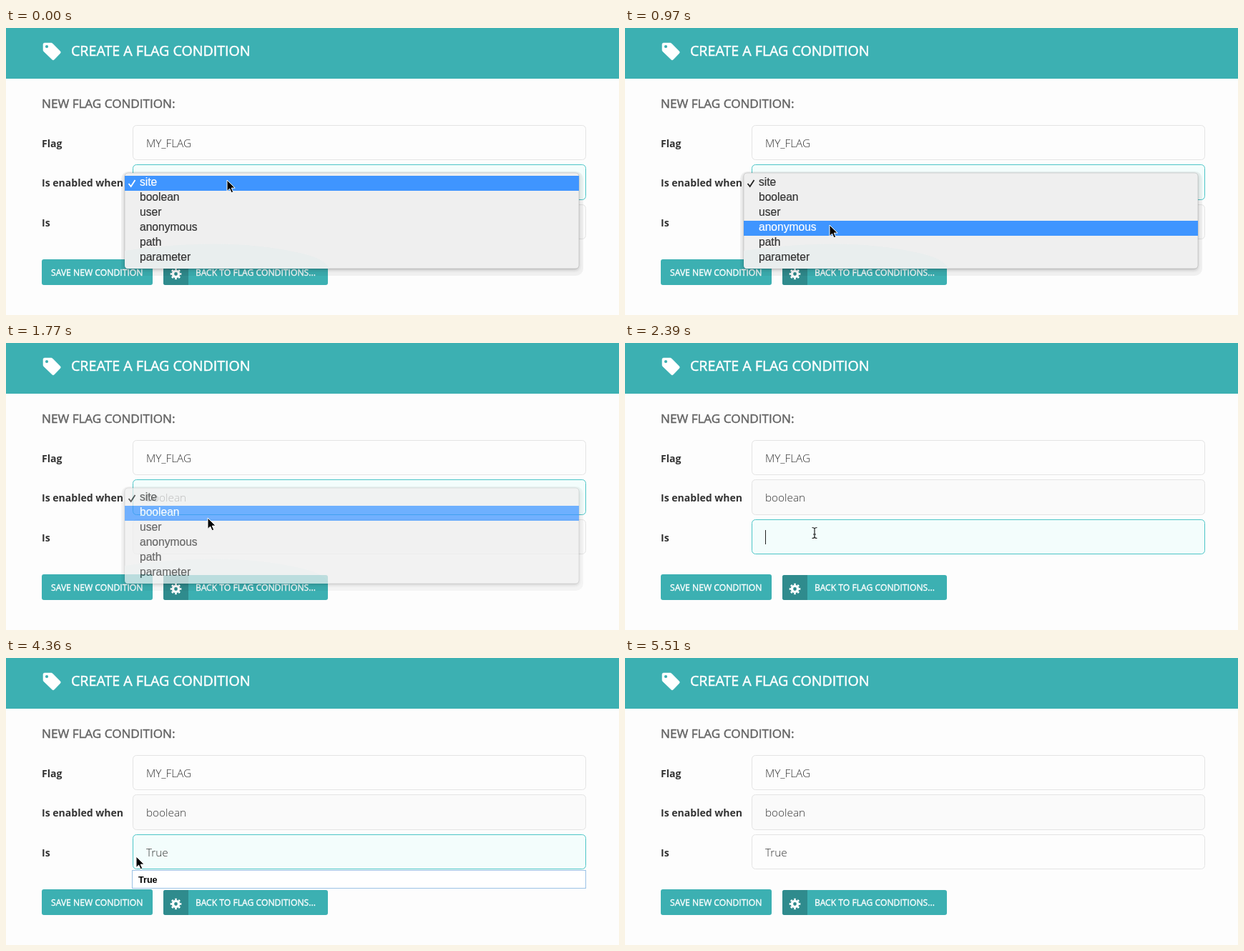
Write an HTML page that moves like this. It is 857 px wide and 402 px high and loops after 6760 ms.

```html
<!DOCTYPE html>
<html lang="en">
<head>
<meta charset="utf-8">
<title>Create a flag condition</title>
<style>
html, body { margin: 0; width: 857px; height: 402px; overflow: hidden; background: #fdfdfd; }
svg { display: block; }
text { font-family: "Open Sans", sans-serif; white-space: pre; }
.caps { fill: #fff; stroke: #fff; stroke-width: .5px; }
.small { font-size: 12.17px; stroke-width: .35px; }
.label { font-size: 14.05px; font-weight: 700; fill: #333; }
.value { font-size: 15.3px; font-weight: 300; fill: #333; }
.field { fill: #fdfdfd; stroke: #e4e4e4; }
.muted { fill: #fafafa; }
.focus { fill: #f3fdfc; stroke: #4cc5c7; }
.teal { fill: #3cb0b2; }
.item, .hint { font-family: "Liberation Sans", Arial, sans-serif; }
.item { font-size: 15.6px; fill: #333; stroke: #333; stroke-width: .2px; }
.item.on { fill: #fff; stroke: #fff; }
.hint { font-size: 12.6px; font-weight: 700; }
#panel { filter: drop-shadow(0 2px 2px rgba(0, 0, 0, .2)); }
</style>
</head>
<body>
<svg width="857" height="402" viewBox="0 0 857 402">
  <rect class="teal" width="857" height="71"/>
  <path fill="#fff" stroke="#fff" stroke-width=".6" d="M52 23q0-2 2-2h9q1.3 0 2.3 1l10.4 10.6q1.3 1.4 0 2.8l-8.4 8.8q-1.3 1.3-2.6 0L53 33q-1-1-1-2.300z"/>
  <circle class="teal" cx="57" cy="26" r="2.100"/>
  <text class="caps" x="91" y="39" font-size="19.63">CREATE A FLAG CONDITION</text>
  <text x="50" y="112" font-size="17.1" fill="#666" stroke="#666" stroke-width=".5">NEW FLAG CONDITION:</text>

  <text class="label" x="50" y="167">Flag</text>
  <text class="label" x="50" y="222">Is enabled when</text>
  <text class="label" x="50" y="278">Is</text>
  <rect class="field" x="177.5" y="136.5" width="633" height="48" rx="5"/>
  <rect class="field" id="kind" x="177.5" y="191.5" width="633" height="49" rx="5"/>
  <rect class="field" id="input" x="177.5" y="247.5" width="633" height="48" rx="5"/>
  <text class="value" x="196" y="167">MY_FLAG</text>
  <text class="value" x="196" y="222">boolean</text>
  <text class="value" x="196" y="278" id="typed"></text>
  <path id="caret" d="M196.500 262v20" stroke="#222"/>

  <rect class="teal" x="50" y="324" width="155" height="36" rx="3"/>
  <text class="caps small" x="63" y="347">SAVE NEW CONDITION</text>
  <rect class="teal" x="220" y="325" width="230" height="35" rx="3"/>
  <path fill="#2f8b8d" d="M255 325v35h-32q-3 0-3-3v-29q0-3 3-3z"/>
  <g fill="none" stroke="#fff" transform="translate(237.5 344.500)">
    <circle r="4.100" stroke-width="3.400"/>
    <circle r="6.500" stroke-width="2.600" pathLength="16" stroke-dasharray="1" stroke-dashoffset=".5"/>
  </g>
  <text class="caps small" x="265" y="347">BACK TO FLAG CONDITIONS...</text>

  <g id="hint">
    <rect x="176.500" y="297.500" width="634" height="25" fill="#fff" stroke="#9cc3e6"/>
    <text class="hint" x="185" y="315">True</text>
  </g>
  <g id="menu">
    <rect x="161" y="201" width="646" height="146" rx="10" opacity=".05"/>
    <path id="panel" fill="#efefef" stroke="#000" stroke-opacity=".12" d="M171 203h625q5 0 5 5v124q0 5-5 5H171q-5 0-5-5V208q0-5 5-5z"/>
    <path fill="#e9eeee" d="M166 312q140-20 240 2q40 8 46 23H171q-5 0-5-5z"/>
    <rect id="bar" x="166" width="635" height="21" fill="#3f95ff"/>
    <path id="check" fill="none" stroke-width="1.800" d="M171.500 218l3.200 4 5.800-9"/>
  </g>
  <path id="arrow" stroke="#fff" stroke-linejoin="round" d="M0 0V15.500l3.600-3.400 2.500 5.600 2.600-1.100-2.500-5.500h5z"/>
  <path id="beam" fill="none" stroke="#222" stroke-width="1.200" d="M-3.500-7.500q3.500 0 3.500 2v11q0 2-3.500 2M3.500-7.500q-3.500 0-3.500 2v11q0 2 3.500 2M-2 2h4"/>
</svg>
<script>
const LOOP = 6760, STEP = 88.8, ROW = 21, TOP = 207;
const $ = id => document.getElementById(id);
const show = (id, on) => $(id).style.display = on ? '' : 'none';
const clamp = (v, max) => Math.max(0, Math.min(max, v));

const items = ['site', 'boolean', 'user', 'anonymous', 'path', 'parameter'].map((name, i) => {
  const text = document.createElementNS('http://www.w3.org/2000/svg', 'text');
  text.textContent = name;
  text.setAttribute('x', 187);
  text.setAttribute('y', TOP + 14 + i * ROW);
  $('menu').append(text);
  return text;
});

// Turning points of the pointer: time, x, y
const path = [
  [90, 309, 213], [530, 298, 256], [880, 288, 288], [1240, 282, 245], [1770, 282, 245],
  [2120, 265, 266], [3920, 265, 266], [4010, 270, 266], [4540, 134, 284],
  [4810, 138, 293], [5080, 644, 351], [5330, 797, 389], [5510, 805, 404]
];

function pointer(t) {
  const next = clamp(path.findIndex(p => p[0] > t), path.length - 1);
  if (t >= path.at(-1)[0]) return path.at(-1).slice(1);
  const [t0, x0, y0] = path[Math.max(0, next - 1)];
  const [t1, x1, y1] = path[next];
  const k = t1 > t0 ? (t - t0) / (t1 - t0) : 0;
  return [x0 + (x1 - x0) * k, y0 + (y1 - y0) * k];
}

function draw(t) {
  // The pointer, the fade and the typing advance in even steps.
  const held = Math.floor((t + 15) / STEP) * STEP;
  const [x, y] = pointer(held).map(Math.round);
  const opacity = clamp((2040 - held) / 360, 1);
  const length = clamp(Math.floor((held - 2820) / 160), 4);
  const blink = t >= 1420 && t < 1510;
  const row = blink ? -1 : t < 1770 ? Math.floor((y - TOP) / ROW) : 1;
  const focused = t >= 2300 && t < 4540;

  show('menu', opacity > 0);
  $('menu').style.opacity = t < 1770 ? 1 : opacity;
  show('bar', row >= 0);
  $('bar').setAttribute('y', TOP + row * ROW);
  $('check').setAttribute('stroke', row ? '#222' : '#fff');
  items.forEach((item, i) => item.setAttribute('class', i === row ? 'item on' : 'item'));

  $('kind').setAttribute('class', t < 2300 ? 'field focus' : 'field muted');
  $('input').setAttribute('class', focused ? 'field focus' : t < 2300 ? 'field muted' : 'field');
  $('typed').textContent = 'True'.slice(0, length);
  show('caret', t >= 2300 && t < 2750);
  show('hint', t >= 3020 && t < 4540);

  const beam = t >= 1950 && t < 4360;
  show('beam', beam);
  show('arrow', !beam);
  $(beam ? 'beam' : 'arrow').setAttribute('transform', `translate(${x} ${y})`);
}

function tick() {
  draw(performance.now() % LOOP);
  requestAnimationFrame(tick);
}
tick();
</script>
</body>
</html>
```
